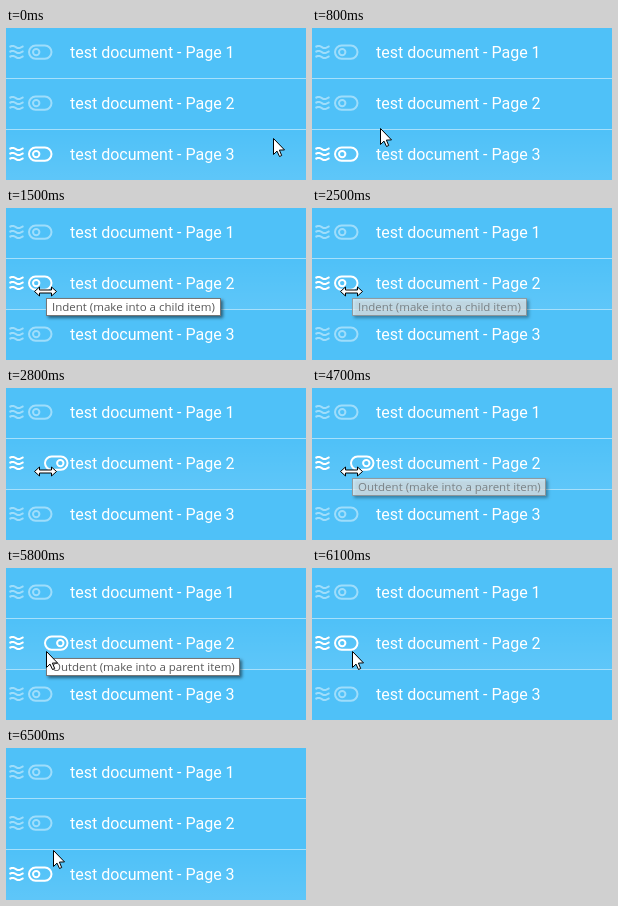
These frames come from a looping animation (300 by 152 pixels, 8500 ms). An HTML page with a canvas:

```html
<!DOCTYPE html>
<html lang="en">
<head>
<meta charset="utf-8">
<title>Page list with indent toggles</title>
<style>
  html, body { margin: 0; width: 100%; height: 100%; overflow: hidden; background: #4fc1f8; }
  canvas { display: block; width: 300px; height: 152px; }
</style>
</head>
<body>
<canvas id="stage"></canvas>
<script>
const W = 300, H = 152, LOOP = 8500, STEP = 100, ROW = 51;
const canvas = document.getElementById('stage');
const ctx = canvas.getContext('2d');
const dpr = window.devicePixelRatio || 1;
canvas.width = Math.round(W * dpr);
canvas.height = Math.round(H * dpr);

// Pointer path: time, x, y
const path = [
  [0, 267, 110], [800, 68, 100], [900, 56, 92], [1000, 47, 86], [1200, 39, 83],
  [2800, 39, 83], [3200, 24, 93], [4100, 24, 93], [4200, 28, 91], [4500, 39, 83],
  [5700, 39, 83], [5800, 40, 83], [6100, 40, 83], [6300, 46, 101], [6400, 47, 102]
];

const clamp = v => Math.max(0, Math.min(1, v));
const ramp = (t, from, to) => clamp((t - from) / (to - from));
const smooth = p => p * p * (3 - 2 * p);
const between = (t, from, to) => t >= from && t < to;

function pointerAt(t) {
  let i = 0;
  while (i < path.length - 1 && path[i + 1][0] <= t) i++;
  const a = path[i], b = path[i + 1] || a;
  let p = b === a ? 0 : (t - a[0]) / (b[0] - a[0]);
  if (i === 0) p = smooth(p);
  return {
    x: Math.round(a[1] + (b[1] - a[1]) * p),
    y: Math.round(a[2] + (b[2] - a[2]) * p),
    resize: between(t, 1100, 2900) || between(t, 4500, 5800)
  };
}

function polygon(points, x, y) {
  ctx.beginPath();
  points.forEach(([px, py]) => ctx.lineTo(x + px, y + py));
  ctx.closePath();
  ctx.fillStyle = '#fff';
  ctx.strokeStyle = '#000';
  ctx.lineWidth = 1;
  ctx.fill();
  ctx.stroke();
}

const arrow = [[0, 0], [0, 16], [3.5, 12.6], [6, 18], [8.2, 17], [5.9, 11.6], [11, 11.4]];
const headLeft = [[-6, 4.5], [-11, 0], [-6, -4.5], [-6, -1.5]];
const resizeArrow = [
  ...headLeft,
  ...headLeft.map(([x, y]) => [-x, y]).reverse(),
  [6, 1.5], [-6, 1.5]
];

function drawPointer({ x, y, resize }) {
  polygon(resize ? resizeArrow : arrow, x + .5, y + .5);
}

function drawWaves(y) {
  ctx.lineWidth = 2;
  for (const mid of [19, 24, 29]) {
    ctx.beginPath();
    for (let x = 0; x <= 14; x++) {
      ctx.lineTo(3.5 + x, y + mid - 1.1 * Math.sin(x / 14 * Math.PI * 2.3));
    }
    ctx.stroke();
  }
}

function drawToggle(x, y, on) {
  ctx.lineWidth = 2;
  ctx.beginPath();
  ctx.roundRect(x + 1, y + 17.5, 22.5, 13.2, 6.6);
  ctx.stroke();
  ctx.beginPath();
  ctx.arc(x + (on ? 16.3 : 8.2), y + 24.1, 3.2, 0, Math.PI * 2);
  ctx.stroke();
}

function drawRow(i, glow, hovered, indented) {
  const y = i * ROW;
  if (hovered) {
    const shade = ctx.createLinearGradient(0, y, 0, y + ROW);
    shade.addColorStop(0, 'rgba(255,255,255,0)');
    shade.addColorStop(1, 'rgba(255,255,255,.09)');
    ctx.fillStyle = shade;
    ctx.fillRect(0, y, W, ROW - 1);
  }
  if (i < 2) {
    ctx.fillStyle = 'rgba(255,255,255,.5)';
    ctx.fillRect(0, y + 50, W, 1);
  }
  ctx.strokeStyle = '#fff';
  ctx.globalAlpha = .45 + .55 * glow;
  drawWaves(y);
  drawToggle(indented ? 38 : 22, y, indented);
  ctx.globalAlpha = 1;
  ctx.font = '16px Roboto, sans-serif';
  ctx.fillStyle = '#fff';
  ctx.fillText('test document - Page ' + (i + 1), 64, y + 30);
}

function drawTip(text, width, alpha) {
  if (alpha <= 0) return;
  ctx.save();
  ctx.globalAlpha = alpha;
  ctx.shadowColor = 'rgba(0,0,0,.5)';
  ctx.shadowBlur = 3 * dpr;
  ctx.shadowOffsetX = ctx.shadowOffsetY = 2 * dpr;
  ctx.fillStyle = '#fff';
  ctx.fillRect(40, 90, width, 18);
  ctx.shadowColor = 'transparent';
  ctx.strokeStyle = '#767676';
  ctx.lineWidth = 1;
  ctx.strokeRect(40.5, 90.5, width - 1, 17);
  ctx.font = '11.5px "Open Sans", sans-serif';
  ctx.fillStyle = '#575757';
  ctx.fillText(text, 46, 103);
  ctx.restore();
}

function draw(t) {
  ctx.setTransform(dpr, 0, 0, dpr, 0, 0);
  ctx.fillStyle = '#4fc1f8';
  ctx.fillRect(0, 0, W, H);

  const onSecond = between(t, 900, 6300);
  const glow = t < 3000 ? ramp(t, 800, 1100) : 1 - ramp(t, 6200, 6500);
  drawRow(0, 0, false, false);
  drawRow(1, glow, onSecond, between(t, 2800, 6100));
  drawRow(2, 1 - glow, !onSecond, false);

  drawTip('Indent (make into a child item)', 175, ramp(t, 1200, 1500) - ramp(t, 2400, 2700));
  drawTip('Outdent (make into a parent item)', 194, ramp(t, 4500, 4800) - ramp(t, 5800, 6000));
  drawPointer(pointerAt(t));
}

const start = performance.now();
function tick() {
  const t = (performance.now() - start) % LOOP;
  draw(Math.floor(t / STEP) * STEP);
  requestAnimationFrame(tick);
}
tick();
</script>
</body>
</html>
```
